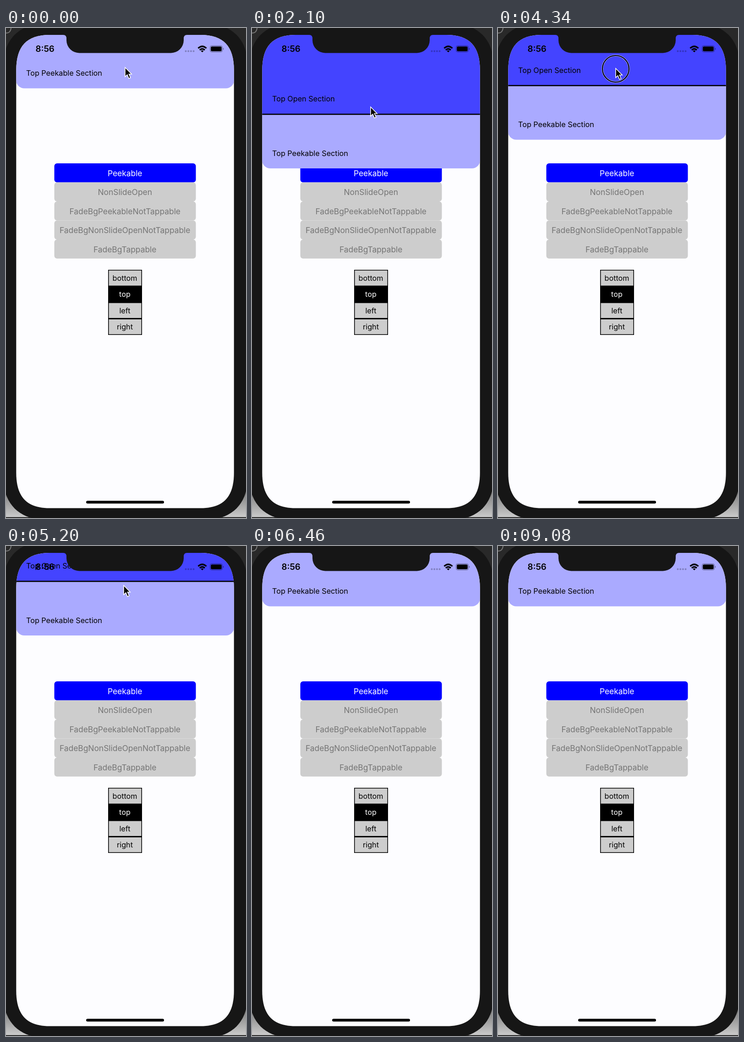
An HTML page that plays this animation: 524x1068 px, repeating every 9.18 s.

```html
<!DOCTYPE html>
<html lang="en">
<head>
<meta charset="utf-8">
<title>Peekable panel</title>
<style>
html, body { margin: 0; width: 100%; height: 100%; overflow: hidden; background: #222; }
svg { display: block; width: 524px; height: 1068px; font: 16.2px Inter, Roboto, sans-serif; }
.mid { text-anchor: middle; }
.btn { font-size: 17.4px; }
</style>
</head>
<body>
<svg viewBox="0 0 524 1068">
  <defs>
    <linearGradient id="desk" x1="0" y1="0" x2="0" y2="1">
      <stop offset="0" stop-color="#606060"/><stop offset="1" stop-color="#cacaca"/>
    </linearGradient>
    <clipPath id="screen">
      <path d="M22.300 92C22.300 40 45 15 95 15H425C475 15 497.700 40 497.700 92V969.500C497.700 1021.500 475 1046.500 425 1046.500H95C45 1046.500 22.300 1021.500 22.300 969.500Z"/>
    </clipPath>
  </defs>

  <rect width="524" height="1068" fill="#292929"/>
  <path d="M0 11Q10 11 11 0" fill="none" stroke="#777" stroke-width="2"/>
  <rect y="990" width="524" height="76" fill="url(#desk)"/>
  <rect x="-4" y="-8" width="530" height="1078" rx="78" fill="#161616"/>

  <g clip-path="url(#screen)">
    <rect width="524" height="1068" fill="#fdfdff"/>
    <g id="buttons"></g>
    <rect x="223" y="527" width="74" height="142"/>
    <path d="M224.500 528.500h71v33h-71zM224.500 599.500h71v32.500h-71zM224.500 635h71v32.500h-71z" fill="#cdcdcd"/>
    <g id="sides"></g>

    <g id="panel">
      <path d="M22-200H498V13H22Z" fill="#4444ff"/>
      <path d="M22 14H498V113.500A18 18 0 0 1 480 131.500H40A18 18 0 0 1 22 113.500Z" fill="#aaaaff"/>
      <rect x="22" y="12.200" width="476" height="2.600"/>
      <text x="44" y="-14.500">Top Open Section</text>
      <text x="44" y="104.400">Top Peekable Section</text>
    </g>

    <text x="64.500" y="52.300" font-size="18.700" font-weight="600">8:56</text>
    <g opacity=".25">
      <circle cx="392.500" cy="50.500" r="2"/><circle cx="398.200" cy="50.500" r="2"/>
      <circle cx="403.900" cy="50.500" r="2"/><circle cx="409.600" cy="50.500" r="2"/>
    </g>
    <g fill="none" stroke="#000" stroke-width="3.200">
      <path d="M419.500 44.200Q428.500 35.800 437.500 44.200"/>
      <path d="M423 48Q428.500 43 434 48"/>
    </g>
    <path d="M425.500 50Q428.500 47.700 431.500 50L428.500 53Z"/>
    <rect x="445.500" y="38.500" width="27" height="14" rx="4" fill="none" stroke="#000" stroke-opacity=".45"/>
    <rect x="447.200" y="40.200" width="23.600" height="10.600" rx="2.500"/>
    <path d="M474 43Q476.500 45.500 474 48Z" opacity=".5"/>
    <rect x="175" y="1030.500" width="170" height="6" rx="3"/>
  </g>

  <path d="M125 14V15Q132 15 132 23V26.500A28 28 0 0 0 160 54.500H360A28 28 0 0 0 388 26.500V23Q388 15 395 15V14Z" fill="#161616"/>

  <g id="pointer">
    <g id="ring" fill="none">
      <circle cy="1" r="29" stroke="#fff" stroke-width="4" stroke-opacity=".5"/>
      <circle cy="1" r="29" stroke="#000" stroke-width="2.200"/>
    </g>
    <path d="M0 0V20L4.700 15.700L8.200 24L11.800 22.500L8.300 14.400H14.200Z" stroke="#fff" stroke-width="1.500"/>
  </g>
</svg>
<script>
const $ = id => document.getElementById(id);
const LOOP = 9180, OPEN = 177.5, OPENED = 1600, CLOSED = 5070;

$('buttons').innerHTML = ['Peekable', 'NonSlideOpen', 'FadeBgPeekableNotTappable',
  'FadeBgNonSlideOpenNotTappable', 'FadeBgTappable'].map((name, i) => {
  const y = 295 + i * 41.5;
  return `<rect x="105.5" y="${y}" width="309" height="41.5" rx="6" fill="${i ? '#cdcdcd' : '#00f'}"/>
    <text class="mid btn" x="259.7" y="${y + 27.5}" fill="${i ? '#757575' : '#fff'}">${name}</text>`;
}).join('');

$('sides').innerHTML = ['bottom', 'top', 'left', 'right'].map((name, i) =>
  `<text class="mid" x="259.5" y="${550.8 + i * 35.4}" fill="${i === 1 ? '#fff' : '#000'}">${name}</text>`
).join('');

// Pointer path: time, x, y
const path = [
  [0, 260, 86], [640, 260, 86], [1380, 259, 173], [1600, 259, 173], [1800, 259, 172],
  [3500, 259, 172], [4340, 257, 88], [4600, 257, 86], [5800, 257, 86], [6200, 262, -40]
];

function pointerAt(t) {
  const i = path.findIndex(p => p[0] > t);
  if (i < 0) return [0, -100];
  const [a, b] = [path[i - 1], path[i]];
  const u = (t - a[0]) / (b[0] - a[0]), e = u * u * (3 - 2 * u);
  return [a[1] + (b[1] - a[1]) * e, a[2] + (b[2] - a[2]) * e];
}

// Critically damped return from one offset to another
function settle(from, to, ms) {
  const k = ms * 0.011;
  return to + (from - to) * (1 + k) * Math.exp(-k);
}

// The panel follows the pointer once it has passed a small drag threshold
function offsetAt(t, y) {
  if (t < OPENED) return Math.max(0, y - 107);
  if (t < 3400) return settle(66, OPEN, t - OPENED);
  if (t < CLOSED) return OPEN - Math.max(0, 153.5 - y);
  return settle(110, 0, t - CLOSED);
}

function draw(now) {
  const t = now % LOOP;
  const [x, y] = pointerAt(t);
  const pressed = t > 450 && t < OPENED || t > 3400 && t < CLOSED;
  $('panel').setAttribute('transform', `translate(0 ${offsetAt(t, y).toFixed(2)})`);
  $('pointer').setAttribute('transform', `translate(${x} ${y})`);
  $('ring').setAttribute('visibility', pressed ? 'visible' : 'hidden');
  requestAnimationFrame(draw);
}
draw(performance.now());
</script>
</body>
</html>
```
